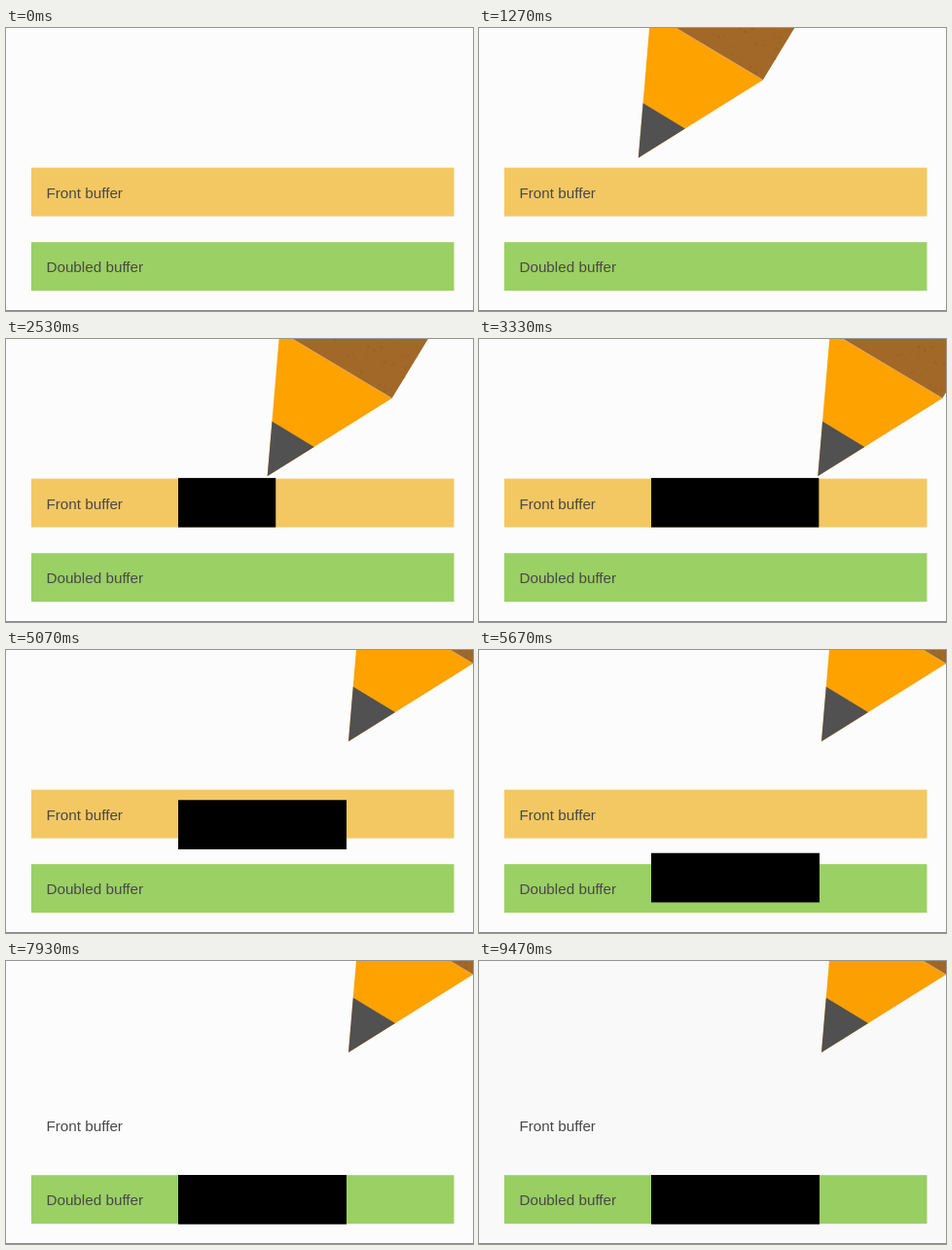
Animation of 480 by 291 pixels, one loop 9540 ms. Source, as an HTML page:

```html
<!DOCTYPE html>
<html lang="en">
<head>
<meta charset="utf-8">
<title>Double buffering</title>
<style>
  html, body { margin: 0; width: 100%; height: 100%; overflow: hidden; background: #fcfcfc; }
  svg { display: block; width: 100vw; height: 100vh; }
  text { font: 15.25px "Liberation Sans", Arial, sans-serif; fill: #484848; }
</style>
</head>
<body>
<svg viewBox="0 0 480 291" preserveAspectRatio="none">
  <rect width="480" height="291" fill="#fcfcfc"/>
  <rect id="front" x="26" y="143.6" width="434.5" height="50" fill="#f3c863"/>
  <rect x="26" y="220.2" width="434.5" height="50" fill="#9bd064"/>
  <text x="41.4" y="175">Front buffer</text>
  <text x="41.4" y="251">Doubled buffer</text>
  <rect id="block" x="177" width="0" height="50.7"/>
  <!-- pencil, with its tip at 0,0 -->
  <g id="pencil">
    <path d="M12.6 -149L128 -80L249 -279L134 -348Z" fill="#a16828"/>
    <g id="grain"></g>
    <path d="M0 0L12.6 -149L128 -80Z" fill="#fea200"/>
    <path d="M12.6 -149L128 -80" stroke="#d9a45c" stroke-width=".8"/>
    <path d="M0 0L4.8 -56.2L48 -30Z" fill="#515151"/>
  </g>
  <rect y="290" width="480" height="1" fill="#8c8c8c"/>
  <rect id="shade" width="480" height="291" opacity="0"/>
</svg>
<script>
const LOOP = 9540;
const [front, block, pencil, grain, shade] =
  ["front", "block", "pencil", "grain", "shade"].map(id => document.getElementById(id));

const clamp = v => Math.min(1, Math.max(0, v));
const mix = (a, b, p) => a + (b - a) * p;
const ease = (t, start, length) =>
  0.5 - 0.5 * Math.cos(Math.PI * clamp((t - start) / length));

// Faint specks on the wood
let seed = 7;
const rand = () => (seed = seed * 16807 % 2147483647) / 2147483647;
for (let i = 0; i < 260; i++) {
  const u = rand(), v = rand() * 0.5;
  const dot = document.createElementNS("http://www.w3.org/2000/svg", "circle");
  dot.setAttribute("cx", 12.6 + 115.4 * u + 121 * v);
  dot.setAttribute("cy", -149 + 69 * u - 199 * v);
  dot.setAttribute("r", 0.5 + rand());
  dot.setAttribute("fill", rand() < 0.5 ? "#8f5a1f" : "#ad7433");
  dot.setAttribute("opacity", 0.35);
  grain.append(dot);
}

function render(t) {
  const lower = ease(t, 770, 680);
  const draw = ease(t, 1457, 1950);
  const lift = ease(t, 3750, 650);
  const drop = ease(t, 4770, 1200);

  const x = mix(194, 158, lower) + 191 * draw + 3 * lift;
  const y = mix(94, 141, lower) - 47 * lift;
  pencil.setAttribute("transform", `translate(${x} ${y})`);
  pencil.setAttribute("visibility", t < 265 ? "hidden" : "visible");

  block.setAttribute("width", 173 * draw);
  block.setAttribute("y", mix(142.9, 220, drop));

  front.setAttribute("opacity", 1 - ease(t, 6270, 800));
  shade.setAttribute("opacity", 0.012 * clamp((t - 9300) / 170));
}

const begin = performance.now();
function tick() {
  render((performance.now() - begin) % LOOP);
  requestAnimationFrame(tick);
}
render(0);
requestAnimationFrame(tick);
</script>
</body>
</html>
```
